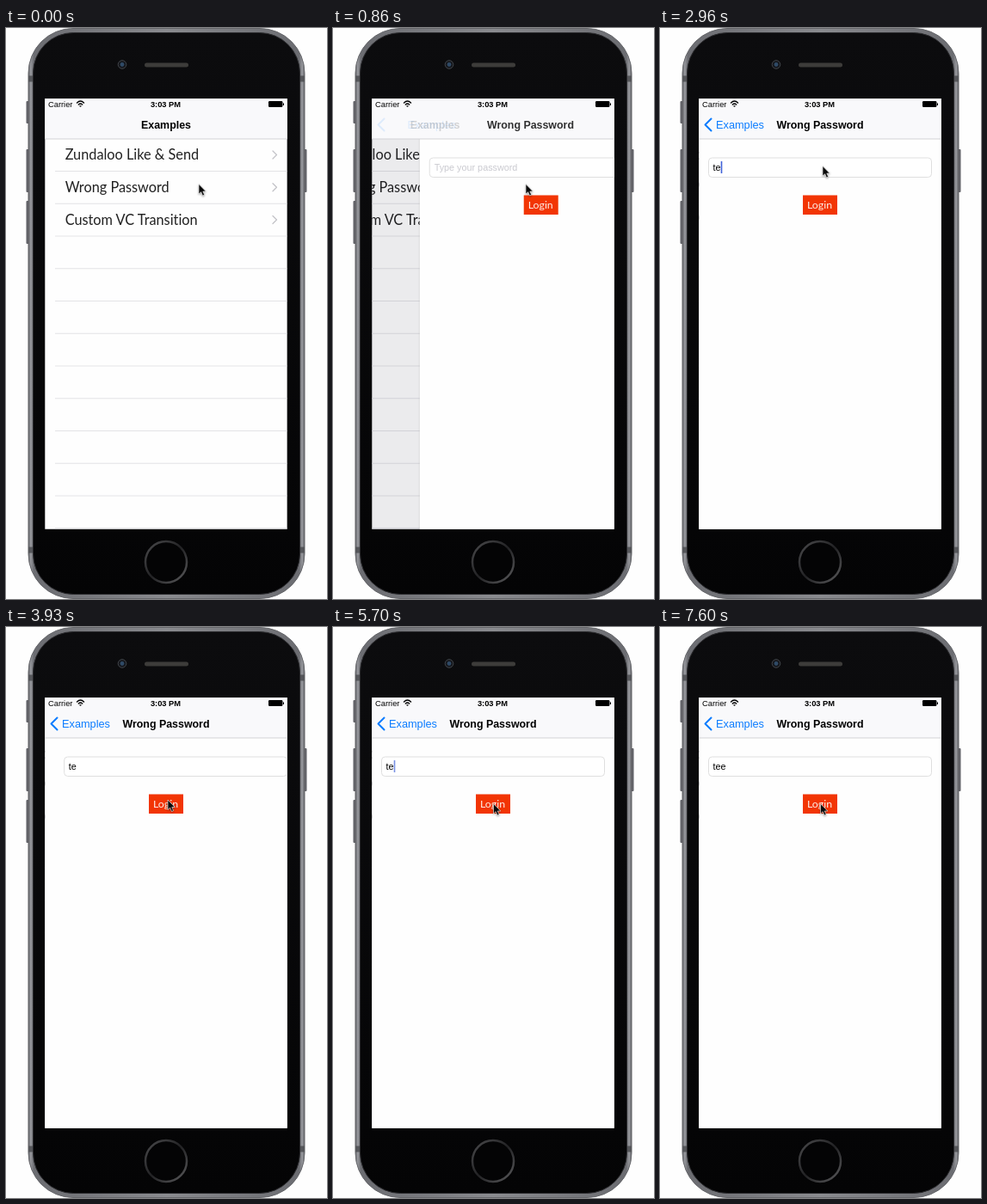
An HTML page that plays this animation: 373x664 px, repeating every 7730 ms.

```html
<!DOCTYPE html>
<html lang="en">
<head>
<meta charset="utf-8">
<title>Wrong password shake</title>
<style>
  html, body { margin: 0; width: 100%; height: 100%; overflow: hidden; background: #fefefe; }
  svg { display: block; width: 373px; height: 664px; }
  text { font-family: "Liberation Sans", Arial, sans-serif; white-space: pre; }
  .rows text, .button text {
    font-family: Lato, "Open Sans", sans-serif;
    font-variant-ligatures: none;
  }
  .rows text { font-size: 16.3px; fill: #222; }
  .button text { font-size: 12.3px; fill: #fff; fill-opacity: .92; }
  .title { font-size: 12.4px; font-weight: bold; text-anchor: middle; }
  .status { font-size: 9.3px; }
  .field text { font-size: 10.8px; }
  .line { fill: none; stroke-linecap: round; stroke-linejoin: round; }
  #cursor { filter: drop-shadow(.5px 1px .8px rgba(0, 0, 0, .4)); }
</style>
</head>
<body>
<svg viewBox="0 0 373 664">
  <defs>
    <linearGradient id="metal">
      <stop offset="0" stop-color="#5c5d62"/>
      <stop offset=".008" stop-color="#96979c"/>
      <stop offset=".02" stop-color="#6b6c71"/>
      <stop offset=".5" stop-color="#8a8b8f"/>
      <stop offset=".98" stop-color="#6b6c71"/>
      <stop offset=".992" stop-color="#96979c"/>
      <stop offset="1" stop-color="#5c5d62"/>
    </linearGradient>
    <linearGradient id="glass" x2="0" y2="1">
      <stop offset="0" stop-color="#0c0c0e"/>
      <stop offset="1" stop-color="#040405"/>
    </linearGradient>
    <linearGradient id="ring" x2="1" y2="1">
      <stop offset="0" stop-color="#4c4c4e"/>
      <stop offset=".5" stop-color="#222224"/>
      <stop offset="1" stop-color="#5c5c5e"/>
    </linearGradient>
    <clipPath id="screen"><rect x="45.3" y="82" width="281.4" height="500.7"/></clipPath>
  </defs>

  <g fill="#626368">
    <rect x="23.5" y="85" width="4" height="26" rx="1"/>
    <rect x="23.5" y="141" width="4" height="50" rx="1"/>
    <rect x="23.5" y="201" width="4" height="50" rx="1"/>
    <rect x="345.5" y="141" width="4" height="50" rx="1"/>
  </g>
  <rect x="26" y=".5" width="321" height="663" rx="52" fill="url(#metal)" stroke="#66676b"/>
  <path d="M26 59H32M341 59H347M26 607H32M341 607H347" stroke="#55565a" stroke-width="7"/>
  <rect x="31.5" y="5.5" width="310" height="653" rx="47" fill="url(#glass)" stroke="#2c2c2f"/>
  <circle cx="135" cy="42.5" r="4.8" fill="#15171c" stroke="#484b50" stroke-width=".9"/>
  <circle cx="135" cy="42.5" r="2.4" fill="#2f4a66"/>
  <rect x="161" y="40.5" width="51" height="5" rx="2.5" fill="#3d3c3a"/>
  <circle cx="186" cy="621" r="24" fill="#040405" stroke="url(#ring)" stroke-width="2.5"/>

  <g clip-path="url(#screen)">
    <rect x="45" y="82" width="282" height="501" fill="#fefefe"/>
    <g id="list" class="rows"></g>
    <rect id="dim" x="45" y="129" width="282" height="454" fill="#101028"/>
    <g id="page">
      <rect x="45" y="129" width="282" height="454" fill="#fefefe"/>
      <path d="M44.5 129V583" stroke="#000" stroke-opacity=".08"/>
      <g id="field" class="field">
        <rect x="56.5" y="151" width="259" height="22.5" rx="4" fill="#fff" stroke="#dfdfdf"/>
        <text id="hint" x="62" y="166" fill="#cacad0">Type your password</text>
        <text id="typed" x="61.5" y="166"></text>
        <rect id="caret" y="155" width="1.6" height="14" fill="#4062d8"/>
      </g>
      <g class="button">
        <rect x="166" y="194.5" width="40" height="22.5" fill="#f23504"/>
        <text x="185.5" y="209.5" text-anchor="middle">Login</text>
      </g>
    </g>

    <rect x="45" y="82" width="282" height="47" fill="#f9f9fb"/>
    <path d="M45 129H327" stroke="#cfcfd2" stroke-width=".9"/>
    <text id="listTitle" class="title" y="117">Examples</text>
    <text id="pageTitle" class="title" y="117">Wrong Password</text>
    <path id="chevron" class="line" d="M59.5 105.5L52.5 112.5L59.5 119.5" stroke="#0a7cff" stroke-width="2"/>
    <text id="back" y="117" font-size="12.75" text-anchor="middle" fill="#0a7cff">Examples</text>
    <text class="status" x="49" y="92">Carrier</text>
    <text class="status" x="185.5" y="92" text-anchor="middle" font-weight="bold">3:03 PM</text>
    <g class="line" stroke="#000" stroke-width="1.4">
      <path d="M82.5 87Q86.5 83.2 90.5 87M84.3 89Q86.5 87 88.7 89"/>
      <circle cx="86.5" cy="90.7" r=".35"/>
    </g>
    <rect x="305" y="85" width="16.4" height="7" rx="1.2"/>
    <rect x="321.8" y="87.2" width="1.2" height="2.7" rx=".5"/>
  </g>

  <path id="cursor" d="M0 0V11.5L2.7 9.2L4.5 13.5L6.6 12.6L4.8 8.5H8.3Z"
        fill="#0a0a0a" stroke="#fff" stroke-opacity=".75" stroke-width=".8"/>
</svg>

<script>
const LOOP = 7730, PUSH = 700, WIDTH = 282;
const SHAKES = [3510, 5840];
const el = Object.fromEntries([...document.querySelectorAll("[id]")].map(node => [node.id, node]));
const clamp = v => Math.max(0, Math.min(1, v));
const mix = (a, b, p) => a + (b - a) * p;
const set = (node, name, value) => node.setAttribute(name, value);
const move = (node, x, y = 0) => set(node, "transform", `translate(${x} ${y})`);

const labels = ["Zundaloo Like &amp; Send", "Wrong Password", "Custom VC Transition"];
el.list.innerHTML = Array.from({ length: 12 }, (_, i) => {
  const y = 166.5 + i * 37.75;
  const label = labels[i] ? `<text x="68.7" y="${y - 13.3}">${labels[i]}</text>
    <path class="line" d="M310 ${y - 23.5}l4.5 4.5l-4.5 4.5" stroke="#c3c3c8" stroke-width="1.3"/>` : "";
  return `${label}<path d="M57 ${y}H327" stroke="#e0e0e4" stroke-width=".9"/>`;
}).join("");

// time, x, y of the pointer tip
const pointer = [
  [1480, 224, 181.5], [1660, 189, 160.5], [2960, 189, 160.5], [3360, 188, 201],
  [4320, 188, 201], [4700, 191.5, 197], [5130, 191.5, 197], [5500, 186.5, 205.5]
];

function pointerAt(t) {
  const next = pointer.findIndex(k => k[0] > t);
  if (next === 0) return pointer[0].slice(1);
  if (next < 0) return pointer.at(-1).slice(1);
  const a = pointer[next - 1], b = pointer[next];
  let p = (t - a[0]) / (b[0] - a[0]);
  p = p * p * (3 - 2 * p);
  return [mix(a[1], b[1], p), mix(a[2], b[2], p)];
}

// critically damped approach to 1
function pushProgress(t) {
  const x = Math.max(0, t - PUSH) * 0.0187;
  return t > 1200 ? 1 : 1 - (1 + x) * Math.exp(-x);
}

function shakeOffset(t) {
  const start = SHAKES.findLast(s => s <= t);
  const s = (t - start) / 1000;
  return s < 1.09 ? 127 * Math.exp(-5.55 * s) * Math.sin(17.65 * s) : 0;
}

// pairs of fade-out and fade-in times
const blinks = [[2980, 3230], [3700, 3960], [4400, 4660], [5130, 5370], [5660, 6790], [7460, 8000]];

function caretAlpha(t) {
  if (t < 2060) return 0;
  return blinks.reduce((a, [out, back]) =>
    a * (1 - clamp((t - out) / 140) + clamp((t - back) / 140)), 1);
}

function draw(t) {
  const p = pushProgress(t);
  move(el.list, -0.3 * WIDTH * p);
  set(el.dim, "opacity", 0.1 * p);
  move(el.page, WIDTH * (1 - p));

  const back = clamp((t - PUSH - 130) / 270);
  set(el.listTitle, "x", mix(186, 102, p));
  set(el.listTitle, "opacity", 0.8 * (1 - p) + 0.2 * (p === 0));
  set(el.back, "x", mix(202, 93, p));
  set(el.back, "opacity", back);
  set(el.chevron, "opacity", back);
  set(el.pageTitle, "x", mix(406, 186, p));
  set(el.pageTitle, "opacity", p);

  const typed = t < 2530 ? "" : t < 2630 ? "t" : t < 6900 ? "te" : "tee";
  el.typed.textContent = typed;
  set(el.hint, "opacity", typed ? 0 : 1);
  set(el.caret, "x", 61.7 + [0, 3, 9, 15][typed.length]);
  set(el.caret, "opacity", caretAlpha(t));
  move(el.field, shakeOffset(t));
  move(el.cursor, ...pointerAt(t));
}

function tick() {
  draw(performance.now() % LOOP);
  requestAnimationFrame(tick);
}
tick();
</script>
</body>
</html>
```
